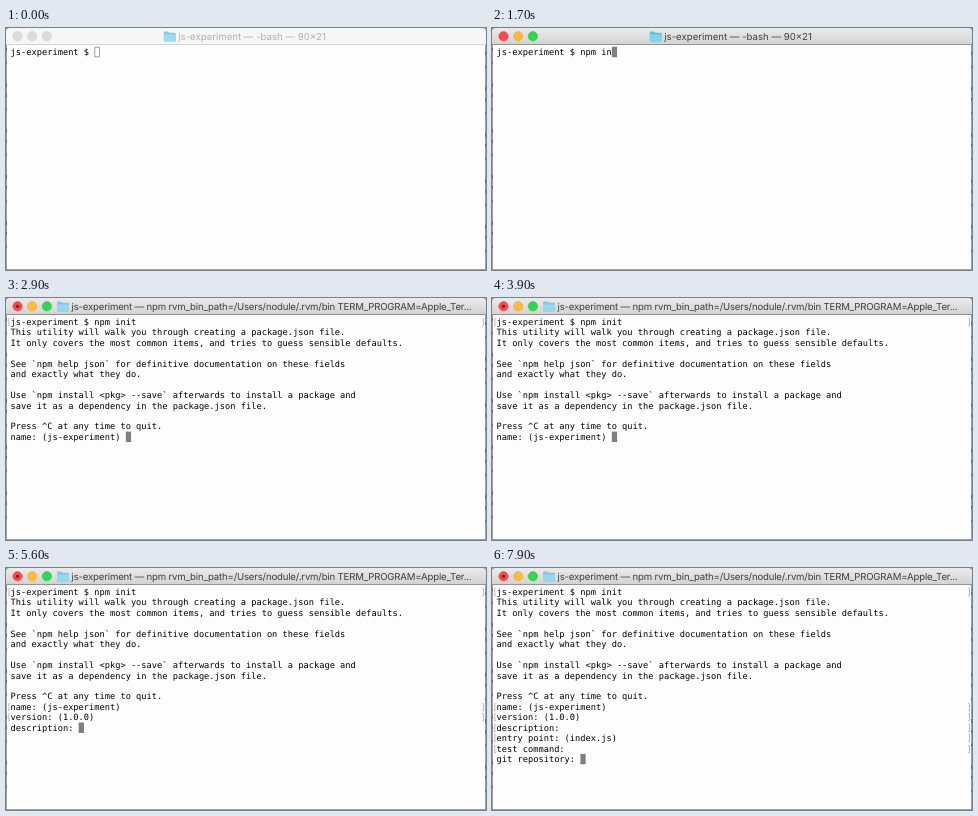
Write an HTML page that moves like this. It is 480x242 px and loops after 8 s.

```html
<!DOCTYPE html>
<html lang="en">
<head>
<meta charset="utf-8">
<title>npm init</title>
<style>
  html, body { margin: 0; width: 100%; height: 100%; overflow: hidden; background: #fefdfe; }
  svg { display: block; width: 480px; height: 242px; }
  text { white-space: pre; text-rendering: geometricPrecision; }
  #screen text { font: 8.7px "DejaVu Sans Mono", monospace; fill: #000; }
  #screen .mark { fill: #aaa; }
  #title { font: 9.62px Inter, sans-serif; fill: #404040; }
  #title.tight { letter-spacing: -0.175px; }
  .light { stroke-width: .5; }
  .inactive #title { fill: #b0b0b0; }
  .inactive #bar { fill: #f6f6f6; }
  .inactive #rule { stroke: #d4d4d4; }
  .inactive .light { fill: #dcdcdc; stroke: #cdcdcd; }
</style>
</head>
<body>
<svg id="stage" viewBox="0 0 480 242">
  <defs>
    <linearGradient id="chrome" x2="0" y2="1">
      <stop stop-color="#ebebeb"/><stop offset="1" stop-color="#d2d2d2"/>
    </linearGradient>
  </defs>
  <rect width="480" height="242" fill="#fefdfe"/>
  <rect width="480" height="8" fill="#999"/>
  <path id="bar" d="M0 16.5V4Q0 0 4 0H476Q480 0 480 4V16.5Z" fill="url(#chrome)"/>
  <path id="rule" d="M0 16.5H480" stroke="#929292"/>
  <path d="M.5 17V242M479.5 17V242M0 241.5H480" stroke="#a0a0a0" fill="none"/>
  <path d="M.5 20V238M479.5 24V236" stroke="#6c6c6c" stroke-dasharray="3 11 2 19 4 7"/>
  <circle class="light" cx="11.5" cy="8.3" r="4.7" fill="#fc4650" stroke="#e5434b"/>
  <circle class="light" cx="26.2" cy="8.3" r="4.7" fill="#fdb942" stroke="#e5a53a"/>
  <circle class="light" cx="40.9" cy="8.3" r="4.7" fill="#30d652" stroke="#2dbd48"/>
  <circle id="busy" cx="11.5" cy="8.3" r="1.6" fill="#7e1512"/>
  <g id="folder">
    <path d="M0 1.2Q0 0 1.2 0H4.3L5.5 1.3H10.8Q12 1.3 12 2.5V9Q12 10 11 10H1Q0 10 0 9Z" fill="#62bfe2"/>
    <path d="M0 2.9H12V9Q12 10 11 10H1Q0 10 0 9Z" fill="#80d4f1"/>
  </g>
  <text id="title" y="12"></text>
  <g id="screen"></g>
  <rect id="cursor"/>
</svg>
<script>
const LOOP = 8000, LEFT = 4.6, TOP = 18.8, COL = 5.238, ROW = 10.44;
const ACTIVE = 500, ENTER = 2200;
const PROMPT = 'js-experiment $ ', COMMAND = 'npm init';
const KEYS = [1100, 1200, 1300, 1400, 1600, 1700, 1800, 1900];
const INTRO = [
  'This utility will walk you through creating a package.json file.',
  'It only covers the most common items, and tries to guess sensible defaults.',
  '',
  'See `npm help json` for definitive documentation on these fields',
  'and exactly what they do.',
  '',
  'Use `npm install <pkg> --save` afterwards to install a package and',
  'save it as a dependency in the package.json file.',
  '',
  'Press ^C at any time to quit.'
];
const QUESTIONS = [
  [2600, 'name: (js-experiment) '],
  [4600, 'version: (1.0.0) '],
  [5300, 'description: '],
  [6000, 'entry point: (index.js) '],
  [7000, 'test command: '],
  [7700, 'git repository: ']
];
const IDLE_TITLE = 'js-experiment — -bash — 90×21';
const BUSY_TITLE = 'js-experiment — npm rvm_bin_path=/Users/nodule/.rvm/bin TERM_PROGRAM=Apple_Ter...';

const $ = id => document.getElementById(id);

function set(el, attrs) {
  for (const key in attrs) el.setAttribute(key, attrs[key]);
}

function addText(string, x, row, className = '') {
  const el = document.createElementNS('http://www.w3.org/2000/svg', 'text');
  set(el, { x, y: TOP + row * ROW + 8.2, class: className });
  el.textContent = string;
  $('screen').append(el);
}

function terminalAt(t) {
  const typed = KEYS.filter(time => time <= t).length;
  const lines = [PROMPT + COMMAND.slice(0, typed)];
  const entered = [];
  if (t >= ENTER) entered.push(0);
  const asked = QUESTIONS.filter(([time]) => time <= t);
  if (asked.length) {
    lines.push(...INTRO);
    asked.forEach(([, text], i) => {
      if (i < asked.length - 1) entered.push(lines.length);
      lines.push(text);
    });
  } else if (t >= ENTER) {
    lines.push('');
  }
  return { lines, entered, active: t >= ACTIVE, busy: t >= ENTER };
}

function draw({ lines, entered, active, busy }) {
  $('stage').classList.toggle('inactive', !active);
  $('busy').style.display = busy ? '' : 'none';
  $('title').textContent = busy ? BUSY_TITLE : IDLE_TITLE;
  set($('title'), { x: busy ? 65.5 : 172.3, class: busy ? 'tight' : '' });
  set($('folder'), {
    transform: `translate(${busy ? 51 : 157.8} 3.5)`,
    opacity: active && !busy ? 1 : .75
  });

  $('screen').replaceChildren();
  lines.forEach((line, row) => addText(line, LEFT, row));
  for (const row of entered) {
    addText('[', 0.4, row, 'mark');
    addText(']', 474.6, row, 'mark');
  }

  const row = lines.length - 1;
  const x = LEFT + lines[row].length * COL, y = TOP + row * ROW;
  set($('cursor'), active
    ? { x, y, width: COL, height: ROW, fill: '#7f7f7f', stroke: 'none' }
    : { x: x + .4, y: y + .4, width: COL - .6, height: ROW - .8, fill: 'none', stroke: '#8c8c8c', 'stroke-width': .8 });
}

const start = performance.now();
let shown = '';
function frame() {
  const state = terminalAt((performance.now() - start) % LOOP);
  const key = JSON.stringify(state);
  if (key !== shown) {
    draw(state);
    shown = key;
  }
  requestAnimationFrame(frame);
}
frame();
</script>
</body>
</html>
```
